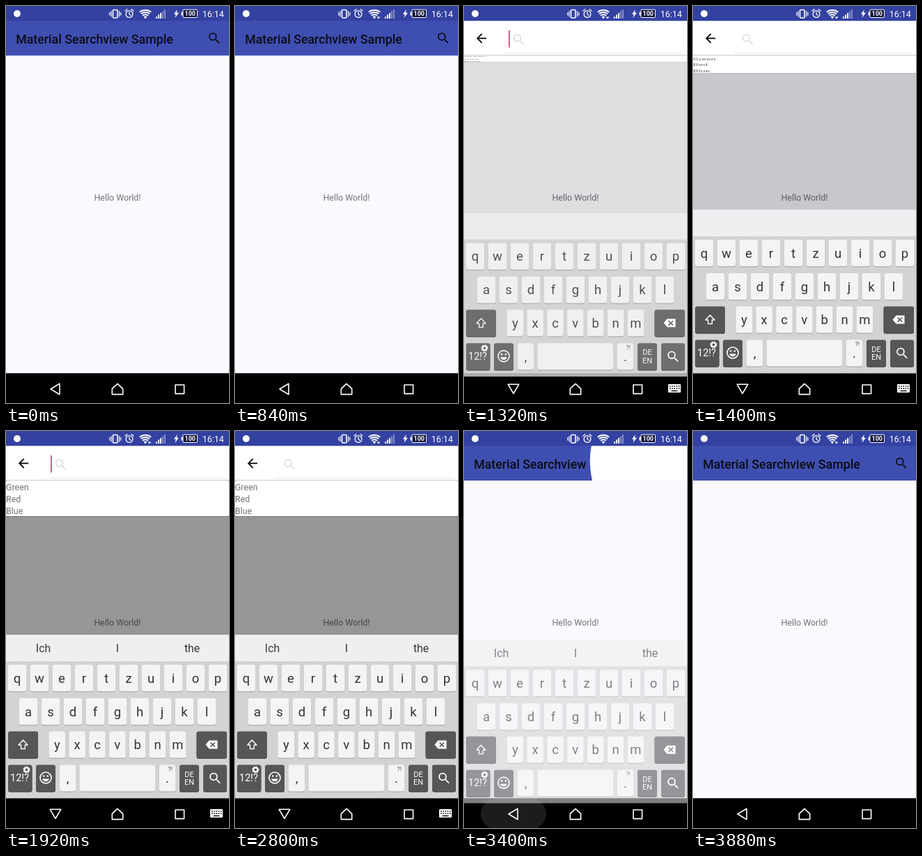
Write an HTML page that moves like this. It is 320 px wide and 569 px high and loops after 3.92 s.

```html
<!DOCTYPE html>
<html lang="en">
<head>
<meta charset="utf-8">
<title>Search view</title>
<style>
  html, body { margin: 0; width: 100%; height: 100%; overflow: hidden; background: #000; }
  svg { display: block; width: 100%; height: 100%; font-family: Roboto, sans-serif; }
  .mid { text-anchor: middle; }
  .line { fill: none; stroke: #fff; stroke-width: 1.6; stroke-linejoin: round; stroke-linecap: round; }
</style>
</head>
<body>
<svg viewBox="0 0 320 569">
  <defs>
    <path id="glass" transform="scale(.889)" d="M15.5 14h-.79l-.28-.27A6.47 6.47 0 0 0 16 9.5 6.5 6.5 0 1 0 9.5 16c1.61 0 3.09-.59 4.23-1.57l.27.28v.79l5 4.99L20.49 19zm-6 0a4.5 4.5 0 1 1 0-9 4.5 4.5 0 0 1 0 9z"/>
    <clipPath id="bar"><rect y="21" width="320" height="50"/></clipPath>
  </defs>

  <rect width="320" height="527" fill="#faf9fd"/>
  <text class="mid" x="160" y="279" font-size="12.44" fill="#737276">Hello World!</text>

  <!-- toolbar -->
  <rect y="21" width="320" height="50" fill="#3f4fb1"/>
  <text x="14.2" y="53.5" font-size="17.78" font-weight="500" fill="#0b0c16">Material Searchview Sample</text>
  <use href="#glass" x="288.3" y="35.5" fill="#0b0c16"/>

  <!-- search bar and suggestions -->
  <rect id="dim" y="71" width="320" height="456"/>
  <g clip-path="url(#bar)"><circle id="reveal" cx="298" cy="43" fill="#fff"/></g>
  <g id="search">
    <path d="M0 70.5H320" stroke="#c9c8cb"/>
    <path d="M57 67.5H313" stroke="#e6e5e8"/>
    <path transform="translate(14.4 35.7) scale(.889)" d="M20 11H7.83l5.59-5.59L12 4l-8 8 8 8 1.41-1.41L7.83 13H20z"/>
    <use href="#glass" x="68" y="37.5" fill="#dddce0"/>
    <rect id="cursor" x="64" y="35" width="1.8" height="24.5" fill="#e8417a"/>
  </g>
  <g id="list">
    <rect y="1" width="320" height="51" rx="2" fill="#77767a"/>
    <rect width="320" height="51" rx="2" fill="#fff"/>
    <g font-size="12.44" fill="#737276">
      <text y="13.5">Green</text><text y="30.5">Red</text><text y="47.5">Blue</text>
    </g>
  </g>

  <!-- status bar -->
  <rect width="320" height="21.3" fill="#3341a1"/>
  <g fill="#fff">
    <circle cx="16" cy="11" r="5"/>
    <rect x="153.5" y="5.5" width="6.5" height="11.5" rx="1" class="line" stroke-width="1.4"/>
    <path class="line" style="stroke-width:1.2" d="M151 7.5V15M162.6 7.5V15M148.8 9.3V13.2M164.8 9.3V13.2"/>
    <g class="line" style="stroke-width:1.3">
      <circle cx="177" cy="11.5" r="4.9"/>
      <path d="M177 8.7V11.8L179 13.2M171 7L174 4.6M183 7L180 4.6"/>
    </g>
    <path d="M200 18.5L197.6 15.6A3.8 3.8 0 0 1 202.4 15.6Z"/>
    <path class="line" style="stroke-width:2;stroke-linecap:butt" d="M191.8 8.6A13 13 0 0 1 208.2 8.6M193.9 11.2A9.6 9.6 0 0 1 206.1 11.2M196 13.8A6.2 6.2 0 0 1 204 13.8"/>
    <path id="traffic" d="M203.6 15.4H208.4L206 18.6Z"/>
    <path d="M215 18V15.3H217V18ZM218 18V12.6H220V18ZM221 18V10H223V18Z"/>
    <path opacity=".4" d="M224 18V7.5H226V18ZM227 18V5H229V18Z"/>
    <path d="M245.8 5L241 11.7H243.8L242.4 17L248 9.8H245Z"/>
    <rect x="254" y="5.2" width="20.5" height="11.3" rx="1" fill="#10143a" stroke="#fff"/>
    <rect x="251.6" y="8.5" width="2" height="5"/>
    <text class="mid" x="264.3" y="14.2" font-size="9" font-weight="700">100</text>
    <text x="281.8" y="15.9" font-size="12.44">16:14</text>
  </g>

  <rect y="526.3" width="320" height="43" fill="#000"/>
  <rect id="ripple" y="526.5" height="44" rx="22" fill="#fff"/>

  <g id="keyboard">
    <rect y="292" width="320" height="38" fill="#efeef1"/>
    <rect y="330" width="320" height="196.3" fill="#d3d2d5"/>
    <g id="words" class="mid" font-size="15.8" fill="#38373a">
      <text x="53.5" y="316.8">Ich</text><text x="160" y="316.8">I</text><text x="267" y="316.8">the</text>
    </g>
    <g id="keys" class="mid"></g>
    <g fill="#fff">
      <path class="line" style="stroke-width:1.4" d="M24.5 443L18 450H21.6V455.5H27.4V450H31Z"/>
      <path d="M286.5 449.5L291.5 443.5H303.5V455.5H291.5Z"/>
      <path d="M293.5 446.5L300 452.7M300 446.5L293.5 452.7" stroke="#565558" stroke-width="1.6"/>
      <g class="mid">
        <text x="19.5" y="502" font-size="14.6">12!?</text>
        <text x="263" y="495.6" font-size="11">DE</text>
        <text x="263" y="506.8" font-size="11">EN</text>
      </g>
      <circle cx="29.5" cy="485.5" r="3" class="line" style="stroke-width:2.2"/>
      <circle cx="29.5" cy="485.5" r="4.4" class="line" style="stroke-width:1.4;stroke-dasharray:1.7 1.75;stroke-linecap:butt"/>
      <circle cx="57" cy="497" r="8" class="line"/>
      <path d="M52.3 498.5H61.7A4.8 4.8 0 0 1 52.3 498.5Z"/>
      <circle cx="54.2" cy="494.5" r="1.3"/><circle cx="59.8" cy="494.5" r="1.3"/>
      <use href="#glass" x="289.5" y="487"/>
    </g>
    <text x="232.5" y="488" font-size="9" fill="#59585b">?!</text>
  </g>

  <!-- navigation -->
  <path id="back" class="line" d="M64 549L77 541.3V556.7Z"/>
  <path class="line" d="M152.3 548.6L160 541.3L167.7 548.6V556.6H152.3Z"/>
  <rect class="line" x="243" y="543" width="12.6" height="12.6"/>
  <g id="imeNav">
    <path class="line" d="M63.3 542.3H78.7L71 555.5Z"/>
    <rect x="293" y="542" width="18" height="12" rx="1" fill="#fff"/>
    <path d="M295 545H309.5M295 548.3H309.5" stroke="#000" stroke-width="1.5" stroke-dasharray="1.6 1.6"/>
    <path d="M297.5 551.6H306.5" stroke="#000" stroke-width="1.4"/>
  </g>
</svg>
<script>
const LOOP = 3920;
const el = id => document.getElementById(id);
const set = (id, attrs) => {
  for (const name in attrs) el(id).setAttribute(name, attrs[name]);
};
const show = (id, on) => set(id, { visibility: on ? 'visible' : 'hidden' });

// Keys
function key(x, y, w, label = '', dark = false) {
  const rect = (dy, fill) =>
    `<rect x="${x}" y="${y + dy}" width="${w}" height="38" rx="3" fill="${fill}"/>`;
  return rect(1.3, dark ? '#434245' : '#adacaf') + rect(0, dark ? '#565558' : '#f4f3f6') +
    `<text x="${x + w / 2}" y="${y + 25.5}" font-size="18.5" fill="#333235">${label}</text>`;
}
const row = (letters, first, pitch, w, y) =>
  [...letters].map((c, i) => key(first + i * pitch - w / 2, y, w, c)).join('');

el('keys').innerHTML =
  row('qwertzuiop', 16, 32, 26.5, 335) +
  row('asdfghjkl', 32, 32, 26.5, 383) +
  row('yxcvbnm', 73.3, 28.85, 23.5, 430.5) +
  key(3, 430.5, 43, '', true) + key(273.5, 430.5, 43.5, '', true) +
  key(3, 478.5, 34.5, '', true) + key(43, 478.5, 28, '', true) +
  key(77, 478.5, 23, ',') + key(105.5, 478.5, 108.5) + key(220, 478.5, 23, '.') +
  key(249, 478.5, 28, '', true) + key(283, 478.5, 34, '', true);

// Motion
const ramp = (t, start, length) => Math.min(1, Math.max(0, (t - start) / length));
const smooth = u => 0.5 - 0.5 * Math.cos(Math.PI * u);

function draw(t) {
  const opening = t < 2500;

  set('reveal', { r: 300 * (smooth(ramp(t, 920, 300)) - smooth(ramp(t, 3230, 300))) });
  show('search', t >= 1215 && t < 3230);
  show('cursor', t >= 1215 && t < 3230 && (t + 80) % 1000 < 500 === false ? false : t >= 1215 && t < 3230);
  show('cursor', t >= 1215 && t < 3230 && (t < 1400 || (t >= 1920 && t < 2400) || t >= 2920));

  const open = ramp(t, 1217, 368) - ramp(t, 3200, 160);
  set('dim', { opacity: 0.4 * open });
  set('list', { transform: `translate(0 71) scale(1 ${smooth(open)})` });
  show('list', open > 0);

  const alpha = opening ? 1 - (1 - ramp(t, 1260, 140)) ** 3 : 1 - ramp(t, 3290, 176) ** 2;
  const travel = opening ? 27 : 18;
  set('keyboard', { opacity: alpha, transform: `translate(0 ${travel * (1 - alpha)})` });
  show('words', t >= 1440 && alpha > 0);

  const imeNav = t >= 1240 && t < 3290;
  show('imeNav', imeNav);
  show('back', !imeNav);

  const half = 47 * Math.sqrt(ramp(t, 3150, 200));
  set('ripple', { x: 71 - half, width: 2 * half, opacity: 0.11 * (1 - ramp(t, 3400, 270)) });
  show('traffic', (t >= 840 && t < 3400) || t >= 3880);
}

const start = performance.now();
function tick() {
  draw((performance.now() - start) % LOOP);
  requestAnimationFrame(tick);
}
tick();
</script>
</body>
</html>
```
